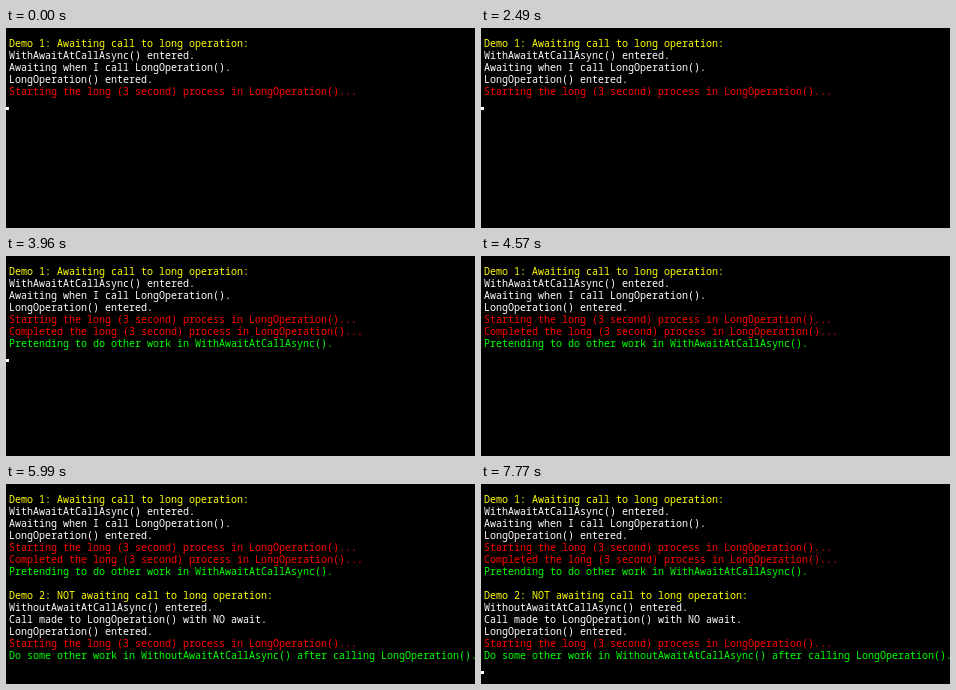
Animation, 469 px wide and 200 px high, one loop 8 s. Source, as an HTML page with a canvas:

```html
<!DOCTYPE html>
<html lang="en">
<head>
<meta charset="utf-8">
<title>Awaiting a long operation</title>
<style>
  html, body { margin: 0; width: 100%; height: 100%; overflow: hidden; background: #000; }
  canvas { display: block; }
</style>
</head>
<body>
<canvas id="stage" width="469" height="200"></canvas>
<script>
const LOOP = 8000;
const LEFT = 3, TOP = 10, ROW = 12, BASELINE = 9;
const YELLOW = '#ff0', WHITE = '#fff', RED = '#f00', GREEN = '#0f0';

const lines = [
  [YELLOW, 'Demo 1: Awaiting call to long operation:'],
  [WHITE, 'WithAwaitAtCallAsync() entered.'],
  [WHITE, 'Awaiting when I call LongOperation().'],
  [WHITE, 'LongOperation() entered.'],
  [RED, 'Starting the long (3 second) process in LongOperation()...'],
  [RED, 'Completed the long (3 second) process in LongOperation()...'],
  [GREEN, 'Pretending to do other work in WithAwaitAtCallAsync().'],
  [WHITE, ''],
  [YELLOW, 'Demo 2: NOT awaiting call to long operation:'],
  [WHITE, 'WithoutAwaitAtCallAsync() entered.'],
  [WHITE, 'Call made to LongOperation() with NO await.'],
  [WHITE, 'LongOperation() entered.'],
  [RED, 'Starting the long (3 second) process in LongOperation()...'],
  [GREEN, 'Do some other work in WithoutAwaitAtCallAsync() after calling LongOperation().']
];

// Output arrives in bursts; the cursor waits on the row below.
const bursts = [
  { at: 0, rows: 5 },
  { at: 3960, rows: 7 },
  { at: 5990, rows: 14 }
];

// Times at which the cursor toggles, starting visible.
const blinks = [930, 1390, 1940, 2490, 3040, 3500, 4570, 5120, 5670, 6690, 7240, 7770];

const ctx = document.getElementById('stage').getContext('2d');

function draw(t) {
  const { rows } = bursts.filter(b => b.at <= t).pop();
  ctx.fillStyle = '#000';
  ctx.fillRect(0, 0, 469, 200);

  ctx.font = '10px "Noto Sans Mono", "DejaVu Sans Mono", monospace';
  ctx.textBaseline = 'alphabetic';
  lines.slice(0, rows).forEach(([color, text], i) => {
    ctx.fillStyle = color;
    ctx.fillText(text, LEFT, TOP + i * ROW + BASELINE);
  });

  const toggles = blinks.filter(b => b <= t).length;
  if (toggles % 2 === 0) {
    ctx.fillStyle = WHITE;
    ctx.fillRect(0, TOP + rows * ROW + BASELINE, 3, 3);
  }
}

const start = performance.now();

function tick() {
  draw((performance.now() - start) % LOOP);
  requestAnimationFrame(tick);
}

tick();
</script>
</body>
</html>
```
